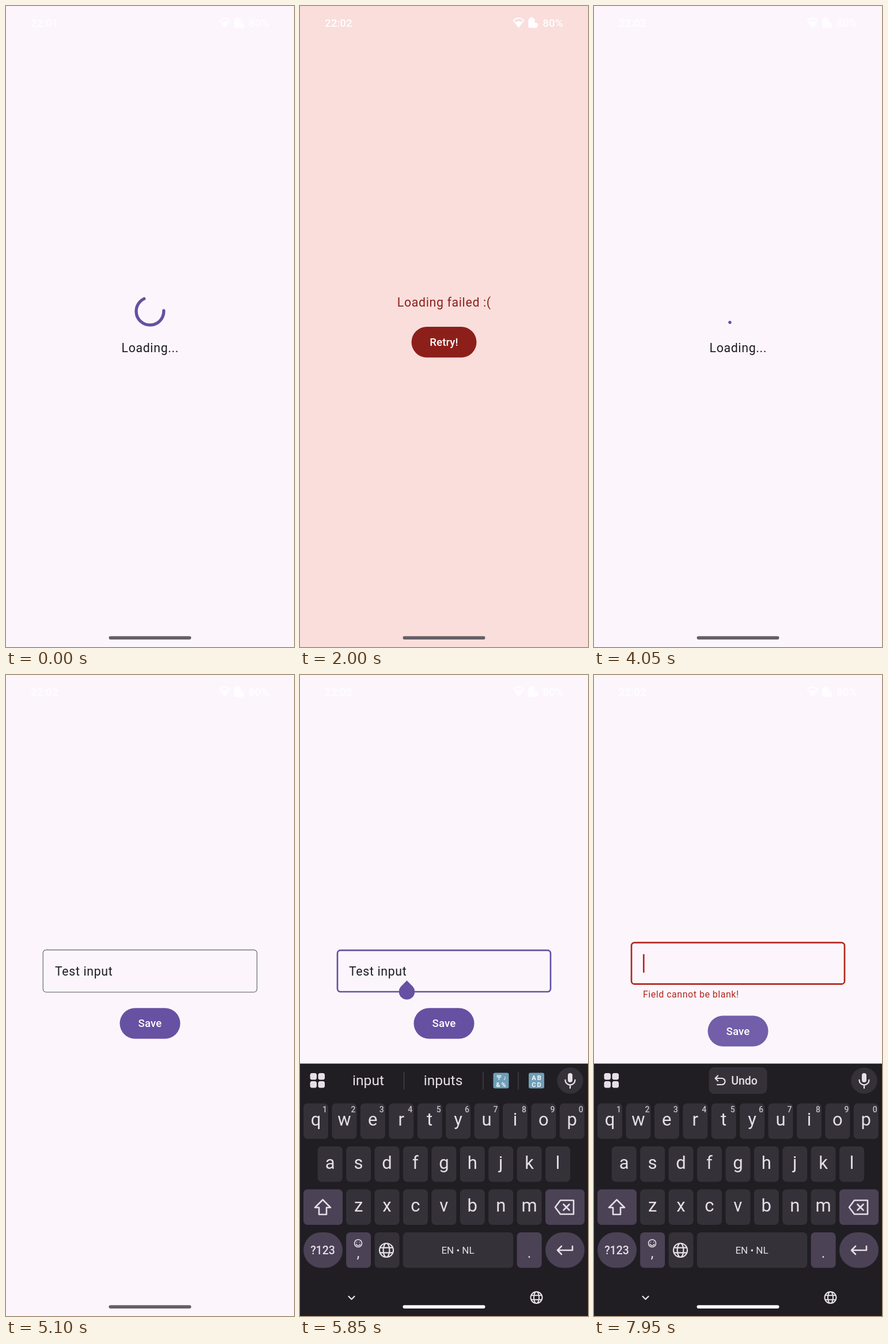
An HTML page with a canvas for the animation above (8000 ms loop, 500 by 1111 pixels).

```html
<!DOCTYPE html>
<html lang="en">
<head>
<meta charset="utf-8">
<title>Loading, retry and form validation</title>
<style>
html, body { margin: 0; height: 100%; overflow: hidden; background: #fcf6fc; }
canvas { display: block; width: 500px; height: 1111px; }
</style>
</head>
<body>
<canvas id="stage" width="500" height="1111"></canvas>
<script>
const ctx = document.getElementById('stage').getContext('2d');
const DP = 1.331, LOOP = 8000;
const BG = '#fcf6fc', INK = '#1c1b1f', PRIMARY = [102, 80, 162], RED = [179, 38, 30], OUTLINE = [121, 116, 126];
const KB = '#201e23', KEY = '#343238', ACCENT = '#4b4256', GLYPH = '#e6dfe8';
const FIELD_X = 250 - 140 * DP, TEXT_X = FIELD_X + 16 * DP, KB_TOP = 673.5;

// Moments in the story, ms
const FAILED = 1649, RETRY = 2745, READY = 4745, FOCUS = 5350, KEYBOARD = 5468, INVALID = 7700;
const FIRST_LOAD = -380;
const DELETES = [6050, ...Array.from({ length: 9 }, (_, i) => 6350 + 75 * i)];
const TOUCHES = [[2700, 2850, 266.5, 577.5], [5250, 5400, 266, 516], [6000, 7200, 462, 913.5], [7600, 7750, 262, 604]];

const clamp = x => Math.min(1, Math.max(0, x));
const rgb = c => `rgb(${c.map(Math.round)})`;
const mix = (a, b, k) => a.map((v, i) => v + (b[i] - v) * k);

function bezier(x, x1, y1, x2, y2) {
  const at = (s, a, b) => 3 * s * (1 - s) * (1 - s) * a + 3 * s * s * (1 - s) * b + s * s * s;
  let lo = 0, hi = 1;
  for (let i = 0; i < 24; i++) {
    const mid = (lo + hi) / 2;
    if (at(mid, x1, x2) < x) lo = mid; else hi = mid;
  }
  return at(lo, y1, y2);
}

// Critically damped spring from 0 to 1
function spring(ms) {
  const s = Math.max(0, ms) / 50;
  return 1 - (1 + s) * Math.exp(-s);
}

function box(x, y, w, h, r, fill) {
  ctx.beginPath();
  ctx.roundRect(x, y, w, h, r);
  ctx.fillStyle = fill;
  ctx.fill();
}

function disc(x, y, r, fill) {
  ctx.beginPath();
  ctx.arc(x, y, r, 0, 7);
  ctx.fillStyle = fill;
  ctx.fill();
}

function line(path, color = GLYPH, width = 2.6) {
  ctx.strokeStyle = color;
  ctx.lineWidth = width;
  ctx.stroke(new Path2D(path));
}

function text(str, x, y, size, color, { weight = 400, align = 'center', gap = 0 } = {}) {
  ctx.font = `${weight} ${size}px Roboto, sans-serif`;
  ctx.letterSpacing = gap + 'px';
  ctx.textAlign = align;
  ctx.fillStyle = color;
  ctx.fillText(str, x, y);
  return ctx.measureText(str).width;
}

const body = (str, x, y, align, color = INK) => text(str, x, y, 16 * DP, color, { align, gap: DP / 2 });

function veil(alpha) {
  ctx.globalAlpha = 1 - alpha;
  ctx.fillStyle = BG;
  ctx.fillRect(0, 0, 500, 1111);
  ctx.globalAlpha = 1;
}

function button(label, y, w, color, glow = 0) {
  box(250 - w / 2, y, w, 40 * DP, 20 * DP, color);
  if (glow) box(250 - w / 2, y, w, 40 * DP, 20 * DP, `rgba(255,255,255,${glow})`);
  text(label, 250, y + 33.2, 14 * DP, '#fff', { weight: 500, gap: 0.13 });
}

function loading(ms) {
  const period = 1332, turn = Math.floor(ms / period), p = ms % period;
  const ease = x => 290 * bezier(clamp(x), .4, 0, .2, 1);
  const head = ease(p / 666), tail = ease((p - 666) / 666);
  const start = turn * 216 - 90 + 286 * p / period + tail + 5.73;
  const rad = Math.PI / 180;
  ctx.beginPath();
  ctx.arc(250, 529, 18 * DP, start * rad, (start + Math.max(head - tail, .1)) * rad);
  ctx.lineCap = 'round';
  ctx.strokeStyle = rgb(PRIMARY);
  ctx.lineWidth = 4 * DP;
  ctx.stroke();
  body('Loading...', 250.3, 600);
}

function failed(t) {
  const dark = '#8c1d18';
  ctx.fillStyle = '#f9dedc';
  ctx.fillRect(0, 0, 500, 1111);
  body('Loading failed :(', 250.3, 520.5, 'center', dark);
  button('Retry!', 556, 113, dark, t >= 2700 ? .1 : 0);
}

function form(t) {
  const bad = t >= INVALID, y = bad ? 462.5 : 475.8;
  const focus = clamp((t - FOCUS) / 150), error = clamp((t - INVALID) / 150);
  const color = rgb(mix(mix(OUTLINE, PRIMARY, focus), RED, error));
  const stroke = DP * (1 + focus);
  ctx.beginPath();
  ctx.roundRect(FIELD_X + stroke / 2, y + stroke / 2, 280 * DP - stroke, 56 * DP - stroke, 4 * DP);
  ctx.strokeStyle = color;
  ctx.lineWidth = stroke;
  ctx.stroke();

  const done = DELETES.filter(d => d <= t).length;
  const width = body('Test input'.slice(0, 10 - done), TEXT_X, y + 44.7, 'left');
  const lastEdit = done ? DELETES[done - 1] : FOCUS;
  if (t >= FOCUS && (t - lastEdit) % 1000 < 500) {
    ctx.fillStyle = color;
    ctx.fillRect(TEXT_X + width - (width ? DP / 2 : 0), y + 21.4, 2 * DP, 24 * DP);
  }
  if (bad) text('Field cannot be blank!', TEXT_X, 559, 12 * DP, rgb(RED), { align: 'left', gap: .4 * DP });
  button('Save', bad ? 590.5 : 577.2, 105, rgb(PRIMARY), .08 * clamp((t - 7600) / 100));
  if (t >= FOCUS && !done) {
    ctx.fillStyle = rgb(PRIMARY);
    ctx.fill(new Path2D('M185.5 529.5L195.2 539.2A13.7 13.7 0 1 1 175.8 539.2Z'));
  }
}

function globe(x, y, r, w) {
  const c = (rx, ry) => `M${x - rx} ${y}a${rx} ${ry} 0 1 0 ${2 * rx} 0a${rx} ${ry} 0 1 0 ${-2 * rx} 0`;
  const h = r * .92, d = r * .37;
  line(c(r, r) + c(r * .45, r) + `M${x - h} ${y - d}h${2 * h}M${x - h} ${y + d}h${2 * h}`, GLYPH, w);
}

function suggestions(t) {
  for (const x of [17.5, 31.5]) for (const y of [690, 704]) box(x, y, 11.5, 11.5, 3.5, GLYPH);
  disc(469, 703, 22.7, KEY);
  box(465, 690, 8, 16, 4, GLYPH);
  line('M460.5 702a8.5 8.5 0 0 0 17 0M469 711v5', GLYPH, 2.3);
  if (t >= 7250) {
    box(199.5, 680, 101, 46, 9, KEY);
    line('M215 694.5l-4.5 4.5l4.5 4.5M211 699h11a5.5 5.5 0 0 1 0 11h-8', GLYPH, 2.2);
    text('Undo', 261, 710, 19.5, GLYPH, { weight: 500 });
    return;
  }
  text('input', 118.5, 711, 24.6, GLYPH);
  text('inputs', 248.5, 711, 24.6, GLYPH);
  for (const x of [180.5, 318, 379]) line(`M${x} 688v30`, '#4a474e', 1.2);
  for (const [x, a, b] of [[335.5, '〒♪', '&%'], [397, 'AB', 'CD']]) {
    box(x, 689.5, 27, 27, 3, '#6f9fb8');
    text(a, x + 14.5, 701.5, 11, '#f4f8fa', { weight: 700, gap: 2 });
    text(b, x + 14.5, 713.5, 11, '#f4f8fa', { weight: 700, gap: 2 });
  }
}

function keyboard(t) {
  const k = bezier(clamp((t - KEYBOARD) / 285), .2, 0, 0, 1);
  ctx.save();
  ctx.translate(0, 438 * (1 - k));
  ctx.lineCap = ctx.lineJoin = 'round';
  ctx.fillStyle = KB;
  ctx.fillRect(0, KB_TOP, 500, 438);
  suggestions(t);

  const key = (x, y, w = 43, fill = KEY, r = 7) => box(x, y, w, 61.5, r, fill);
  [['qwertyuiop', 6, 742.5], ['asdfghjkl', 30.7, 817], ['zxcvbnm', 80.1, 891.5]].forEach(([row, x0, y], r) =>
    [...row].forEach((ch, i) => {
      const x = x0 + 49.42 * i;
      key(x, y);
      text(ch, x + 21.5, y + 38.5, 31, GLYPH);
      if (!r) text((i + 1) % 10, x + 37, 757.5, 14, '#c9c3cb', { weight: 500 });
    }));

  key(6, 891.5, 68, ACCENT);
  line('M39.5 909.5L53 923H46V935H33V923H26Z');
  key(426, 891.5, 68, ACCENT);
  line('M452 910.5H475V934.5H452L443 922.5ZM457.5 917.5l10 10M467.5 917.5l-10 10');

  key(6, 966, 68, ACCENT, 31);
  text('?123', 39.5, 1003.5, 19.5, GLYPH, { weight: 500 });
  key(80.1, 966, 43, ACCENT);
  line('M94.5 985a6.5 6.5 0 1 0 13 0a6.5 6.5 0 1 0 -13 0M97.5 986.5a3.7 3.7 0 0 0 7 0M98.5 983h.1M103.5 983h.1', GLYPH, 1.6);
  text(',', 101, 1010, 25, GLYPH);
  key(129.5, 966);
  globe(150, 997, 12, 2.2);
  key(178.7, 966, 191.5);
  text('EN • NL', 274, 1003, 17, GLYPH);
  key(376.6, 966, 43, ACCENT);
  text('.', 398, 1010, 25, GLYPH);
  key(426, 966, 68, ACCENT, 31);
  line('M473 990V997H447M454 990l-7 7l7 7');

  line('M84.5 1077l5 5l5 -5', GLYPH, 2.3);
  globe(410.5, 1079, 10, 2);
  ctx.restore();
}

function statusBar(t) {
  const white = '#fffdff';
  text(t < FAILED ? '22:01' : '22:02', 43, 35.5, 18.8, white, { weight: 500, align: 'left' });
  text('80%', 456.5, 35.5, 18.8, white, { weight: 500, align: 'right' });
  ctx.lineCap = ctx.lineJoin = 'round';
  ctx.fillStyle = white;
  ctx.fill(new Path2D('M379.5 37L373 28.5Q379.5 24 386 28.5Z'));
  line('M379.5 36.5L370.5 25Q379.5 17 388.5 25Z', white, 1.8);
  box(399.5, 19.5, 5, 3, 1, white);
  box(396.5, 21.5, 11, 16.5, 2, white);
  disc(408.5, 33.5, 4.8, white);
}

function touches(t) {
  for (const [from, to, x, y] of TOUCHES) {
    if (t < from || t >= to) continue;
    disc(x, y, 12, 'rgba(215,208,214,.6)');
    ctx.strokeStyle = 'rgba(140,160,210,.6)';
    ctx.lineWidth = 1.4;
    ctx.stroke();
  }
}

function draw(t) {
  veil(0);
  if (t < FAILED) {
    loading(t - FIRST_LOAD);
  } else if (t < RETRY) {
    failed(t);
    veil(spring(t - FAILED));
  } else if (t < READY) {
    loading(t - RETRY);
    veil(spring(t - RETRY));
  } else {
    form(t);
    veil(spring(t - READY));
    if (t > KEYBOARD) keyboard(t);
  }
  statusBar(t);
  box(178.5, 1092.3, 143, 5.6, 2.8, rgb(mix([102, 95, 102], [255, 255, 255], clamp((t - 5550) / 250))));
  touches(t);
}

function tick() {
  draw(performance.now() % LOOP);
  requestAnimationFrame(tick);
}
tick();
</script>
</body>
</html>
```
